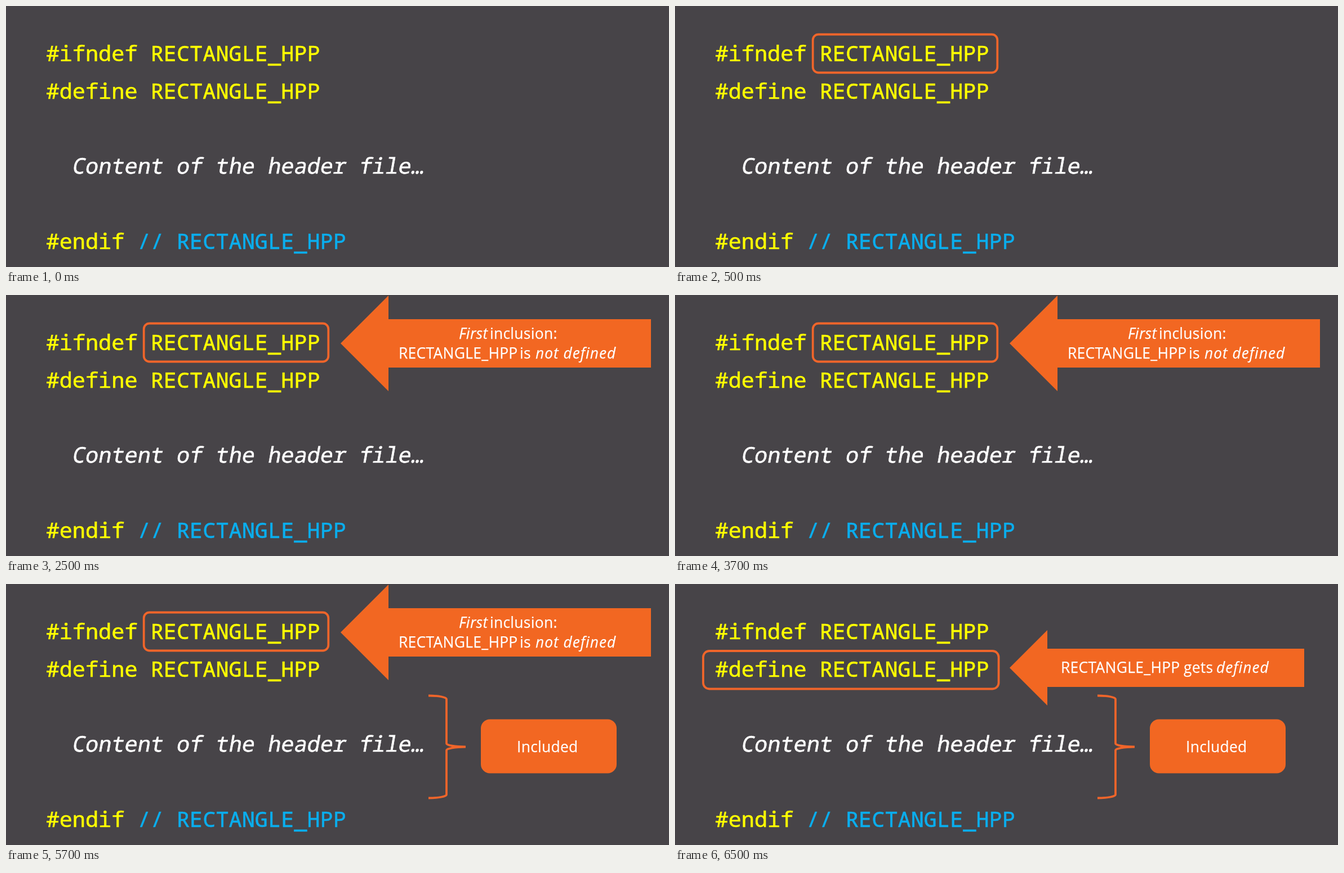
These frames come from a looping animation (1177x464 px, 8 s). An HTML page:

```html
<!DOCTYPE html>
<html lang="en">
<head>
<meta charset="utf-8">
<title>Include guard</title>
<style>
html, body { margin: 0; width: 100%; height: 100%; overflow: hidden; background: #474448; }
svg { display: block; width: 1177px; height: 464px; }
text { white-space: pre; }
.code { font: 38.6px "Noto Sans Mono", monospace; fill: #ff0; stroke: #ff0; stroke-width: .6; }
.code .note { fill: #0aaeee; stroke: #0aaeee; }
.code .body { fill: #fff; stroke: #fff; }
.low { baseline-shift: -2px; }
.label { font: 26.4px "Open Sans", sans-serif; letter-spacing: .3px; fill: #fff; stroke: #fff; stroke-width: .25; }
.label .em { font-style: italic; letter-spacing: 1px; }
.line { fill: none; stroke: #f0652a; stroke-width: 3.8; }
.fill { fill: #f26722; }
.check, .first, .included, .define { visibility: hidden; animation: 8s step-end infinite; }
.check { animation-name: check; }
.first { animation-name: first; }
.included { animation-name: included; }
.define { animation-name: define; }
@keyframes check {
  0% { visibility: hidden; }
  6.25% { visibility: visible; }
  81.25%, 100% { visibility: hidden; }
}
@keyframes first {
  0% { visibility: hidden; }
  31.25% { visibility: visible; }
  81.25%, 100% { visibility: hidden; }
}
@keyframes included {
  0% { visibility: hidden; }
  56.25%, 100% { visibility: visible; }
}
@keyframes define {
  0% { visibility: hidden; }
  81.25%, 100% { visibility: visible; }
}
</style>
</head>
<body>
<svg viewBox="0 0 1177 464">
  <rect width="1177" height="464" fill="#474448"/>
  <g class="code">
    <text x="71.5" y="97.5">#ifndef RECTANGLE<tspan class="low">_</tspan>HPP</text>
    <text x="71.5" y="164.5">#define RECTANGLE<tspan class="low">_</tspan>HPP</text>
    <text class="body" transform="translate(116.2 297.5) skewX(-10)">Content of the header file…</text>
    <text x="71.5" y="431.5">#endif <tspan class="note">// RECTANGLE<tspan class="low">_</tspan>HPP</tspan></text>
  </g>

  <rect class="check line" x="244.7" y="50.5" width="327.6" height="68" rx="10"/>

  <g class="first">
    <path class="fill" d="M594 86 L679 1 V43 H1145 V129 H679 V171 Z"/>
    <g class="label">
      <text class="em" x="804" y="78" style="letter-spacing:.4px">First</text>
      <text x="859" y="78">inclusion:</text>
      <text x="697" y="113">RECTANGLE_HPP</text>
      <text x="912" y="113">is</text>
      <text class="em" x="940" y="113">not defined</text>
    </g>
  </g>

  <g class="included">
    <path class="line" d="M750 198.5 A32 6 0 0 1 782 204.5 V283.5 A34 6 0 0 0 816 289.5 A34 6 0 0 0 782 295.5 V374.5 A32 6 0 0 1 750 380.5"/>
    <rect class="fill" x="843" y="240.5" width="241" height="96" rx="16"/>
    <text class="label" x="907" y="299">Included</text>
  </g>

  <g class="define">
    <rect class="line" x="50" y="119" width="524.6" height="67.5" rx="11"/>
    <path class="fill" d="M594 149 L661 82 V115 H1117 V183 H661 V216 Z"/>
    <g class="label">
      <text x="685" y="158">RECTANGLE_HPP</text>
      <text x="903" y="158">gets</text>
      <text class="em" x="961" y="158">defined</text>
    </g>
  </g>
</svg>
</body>
</html>
```
